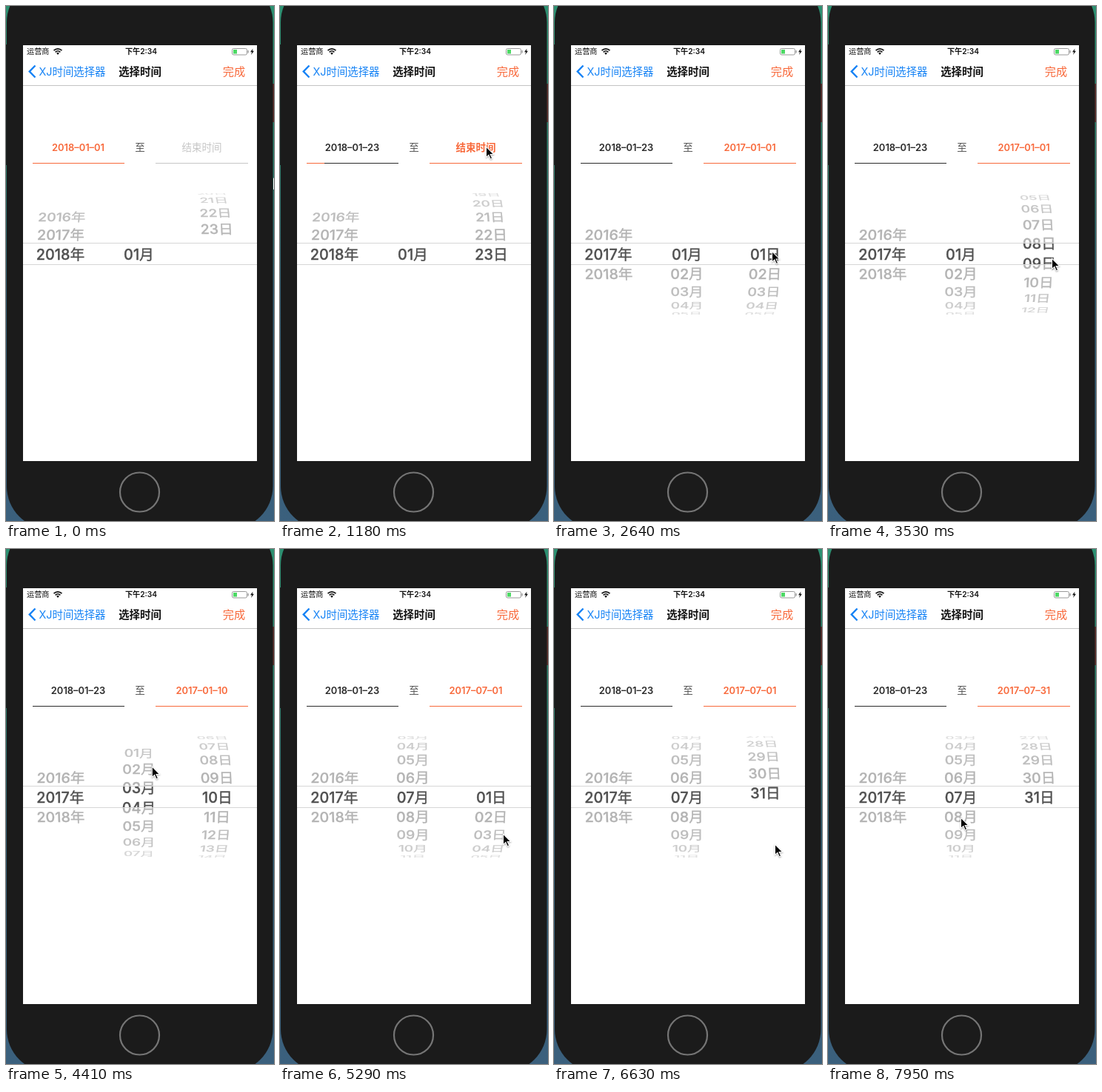
An HTML page with a canvas for the animation above (8 s loop, 362x696 px).

```html
<!DOCTYPE html>
<html lang="zh-CN">
<head>
<meta charset="utf-8">
<title>选择时间</title>
<style>
html, body { margin: 0; width: 362px; height: 696px; overflow: hidden; background: #1b1b1b; }
canvas { display: block; }
</style>
</head>
<body>
<canvas id="stage" width="362" height="696"></canvas>
<script>
const g = document.getElementById('stage').getContext('2d');
const LOOP = 8000, STEP = 147.2, LEAD = 10;
const FONT = 'Inter, "Noto Sans CJK SC", "Noto Sans CJK JP", "Noto Sans CJK", sans-serif';
const ORANGE = '#f8693b', DARK = '#2b2b2b', BLUE = '#1683f5';
const MID = 335.6, RADIUS = 84, PITCH = 18.4 * Math.PI / 180;

const ease = {
  lin: p => p,
  out: p => 1 - (1 - p) ** 3,
  io: p => p * p * (3 - 2 * p)
};

// Keys are [time, ease into the key, ...values].
function track(keys, t) {
  let a = keys[0];
  for (const b of keys) {
    if (t < b[0]) {
      const p = ease[b[1]]((t - a[0]) / (b[0] - a[0]));
      return a.slice(2).map((v, i) => v + (b[i + 2] - v) * p);
    }
    a = b;
  }
  return a.slice(2);
}

const pointer = [
  [0, 'lin', 361, 232], [150, 'lin', 361, 232], [880, 'io', 278, 189],
  [1330, 'lin', 278, 189], [1850, 'io', 78, 314], [1980, 'lin', 78, 316],
  [2210, 'io', 80, 346], [2640, 'io', 294, 330], [2800, 'io', 297, 384],
  [3090, 'io', 307, 284], [3250, 'lin', 308, 276], [3530, 'io', 302, 340],
  [3850, 'io', 297, 372], [4200, 'io', 190, 396], [4440, 'io', 197, 290],
  [4720, 'out', 204, 250], [5200, 'io', 301, 384], [5300, 'lin', 301, 384],
  [5580, 'io', 346, 190], [5740, 'io', 350, 184], [5890, 'lin', 328, 275],
  [6250, 'out', 302, 384], [6620, 'io', 298, 398], [7080, 'lin', 298, 398],
  [7800, 'io', 179, 362]
];

const yearKeys = [[0, 'lin', 2], [1980, 'lin', 2], [2500, 'io', 1]];
const monthKeys = [[0, 'lin', 0], [4250, 'lin', 0], [4440, 'io', 2.6], [5100, 'out', 6]];
const firstDay = [[0, 'lin', 23.3], [700, 'out', 22]];
const secondDay = [[0, 'lin', 0], [2830, 'lin', 0], [3090, 'io', 4], [3530, 'lin', 7.53], [4100, 'out', 9]];
const thirdDay = [[0, 'lin', 0], [5310, 'lin', 0], [5580, 'io', 8], [6300, 'out', 30.9],
  [6620, 'io', 30.23], [6850, 'out', 30]];

function text(str, x, y, size, color, weight = 400, align = 'center') {
  g.font = `${weight} ${size}px ${FONT}`;
  g.textAlign = align;
  g.fillStyle = color;
  g.fillText(str, x, y);
}

function rect(x, y, w, h, color) {
  g.fillStyle = color;
  g.fillRect(x, y, w, h);
}

function shape(points, color) {
  g.beginPath();
  points.forEach(([x, y]) => g.lineTo(x, y));
  g.closePath();
  g.fillStyle = color;
  g.fill();
}

function box(x, y, w, h, r) {
  g.beginPath();
  g.roundRect(x, y, w, h, r);
}

function phone() {
  const wall = g.createLinearGradient(0, 0, 0, 696);
  wall.addColorStop(0, '#2c9071');
  wall.addColorStop(0.3, '#2b7a68');
  wall.addColorStop(0.55, '#315c70');
  wall.addColorStop(1, '#3b607d');
  rect(0, 0, 362, 696, wall);
  rect(0, 52, 1, 163, '#17211f');
  rect(360, 105, 2, 52, '#5b2f2c');
  box(1, -36, 359.5, 743, 58);
  g.fillStyle = '#1b1b1b';
  g.fill();
  g.beginPath();
  g.arc(180.5, 657, 26.5, 0, 7);
  g.strokeStyle = '#757575';
  g.lineWidth = 2.2;
  g.stroke();
  rect(23, 53, 316, 562, '#fff');
}

function statusBar() {
  text('运营商', 28, 65, 10.2, '#111', 400, 'left');
  g.strokeStyle = '#111';
  g.lineWidth = 1.7;
  for (const r of [4.7, 7.7]) {
    g.beginPath();
    g.arc(70, 65.6, r, -Math.PI * 0.75, -Math.PI * 0.25);
    g.stroke();
  }
  g.beginPath();
  g.moveTo(70, 66);
  g.arc(70, 65.6, 2.6, -Math.PI * 0.75, -Math.PI * 0.25);
  g.fillStyle = '#111';
  g.fill();
  text('下午2:34', 182.5, 65, 10.2, '#111', 600);
  box(305.5, 57.5, 20, 8.5, 2);
  g.strokeStyle = '#999';
  g.lineWidth = 1;
  g.stroke();
  rect(307, 59, 5, 5.5, '#4cd964');
  rect(326.5, 60, 1.3, 3.5, '#999');
  shape([[333.5, 57.5], [330, 62.3], [332.2, 62.3], [331, 66], [335, 60.8], [332.8, 60.8]], '#111');
}

function navBar() {
  g.beginPath();
  g.moveTo(39.5, 80.5);
  g.lineTo(31.8, 88.5);
  g.lineTo(39.5, 96.5);
  g.strokeStyle = BLUE;
  g.lineWidth = 2.5;
  g.stroke();
  text('XJ时间选择器', 44.5, 94, 14.4, BLUE, 400, 'left');
  text('选择时间', 181, 94, 14.4, '#111', 700);
  text('完成', 308, 94, 15.2, ORANGE);
  rect(23, 107, 316, 1, '#c3c3c3');
}

function fields(n) {
  const ending = n >= 8;
  const date = (str, x, color) => text(str.replaceAll('-', '–'), x, 196, 12.9, color, 600);
  date(n < 4 ? '2018-01-01' : '2018-01-23', 97.5, ending ? DARK : ORANGE);
  text('至', 181, 196, 13.5, '#555');
  if (n < 17) text('结束时间', 264.5, 196, 13.5, ending ? ORANGE : '#c6c6c6', ending ? 600 : 400);
  else date(n < 28 ? '2017-01-01' : n < 35 ? '2017-01-10' :
    n < 48 ? '2017-07-01' : '2017-07-31', 264.5, ORANGE);
  rect(36, 212, 124, 1, ending ? DARK : ORANGE);
  if (n === 8) rect(36, 212, 24, 1, ORANGE);
  rect(202, 212, 125, 1, ending ? ORANGE : '#c6c6c6');
}

function wheelRows(x, pos, count, label, picked) {
  for (let i = 0; i < count; i++) {
    const a = (i - pos) * PITCH;
    if (Math.abs(a) > 1.52) continue;
    const c = Math.cos(a), s = Math.sin(a);
    const scale = 1 - 0.09 * (1 - c), dx = x - 180;
    const grey = Math.round(176 + 66 * (1 - c));
    const color = picked ? '#505050' : `rgb(${grey},${grey},${grey})`;
    g.save();
    g.transform(scale, 0, -dx * 0.09 * s / RADIUS, c, 180 + dx * scale, MID + RADIUS * s);
    text(label(i), 0, 7.4, 19.8, color, 500);
    g.strokeStyle = color;
    g.lineWidth = 0.35;
    g.strokeText(label(i), 0, 7.4);
    g.restore();
  }
}

function picker(t, n) {
  const two = v => String(v + 1).padStart(2, '0');
  const late = n >= 17;
  const dayKeys = !late ? firstDay : n < 35 ? secondDay : thirdDay;
  const wheels = [
    [73.5, track(yearKeys, t)[0], 3, i => 2016 + i + '年'],
    [179.5, track(monthKeys, t)[0], late ? 12 : 1, i => two(i) + '月'],
    [285.5, track(dayKeys, t)[0], late ? 31 : 23, i => two(i) + '日']
  ];
  const bands = [[253, 67, false], [320, 30, true], [350, 67, false]];
  for (const [y, h, picked] of bands) {
    g.save();
    g.beginPath();
    g.rect(23, y, 316, h);
    g.clip();
    for (const w of wheels) wheelRows(...w, picked);
    g.restore();
  }
  rect(23, 320, 316, 1, '#d6d6d6');
  rect(23, 349, 316, 1, '#d6d6d6');
}

function arrow([x, y]) {
  g.save();
  g.translate(x, y);
  g.shadowColor = 'rgba(0,0,0,.35)';
  g.shadowBlur = 2;
  g.shadowOffsetY = 1;
  shape([[0, 0], [0, 16.5], [3.7, 13.2], [6.2, 18.6], [9.2, 17.2], [6.8, 12], [11.8, 12]], '#fff');
  g.shadowColor = 'transparent';
  shape([[1, 2.4], [1, 14.2], [4, 11.5], [6.6, 17.2], [7.9, 16.6], [5.3, 11], [9.5, 11]], '#000');
  g.restore();
}

function draw(now) {
  const n = Math.floor((now % LOOP + LEAD) / STEP), t = n * STEP;
  phone();
  statusBar();
  navBar();
  fields(n);
  picker(t, n);
  arrow(track(pointer, t));
}

let start;
function tick(now) {
  start ??= now;
  draw(now - start);
  requestAnimationFrame(tick);
}
draw(0);
requestAnimationFrame(tick);
</script>
</body>
</html>
```
